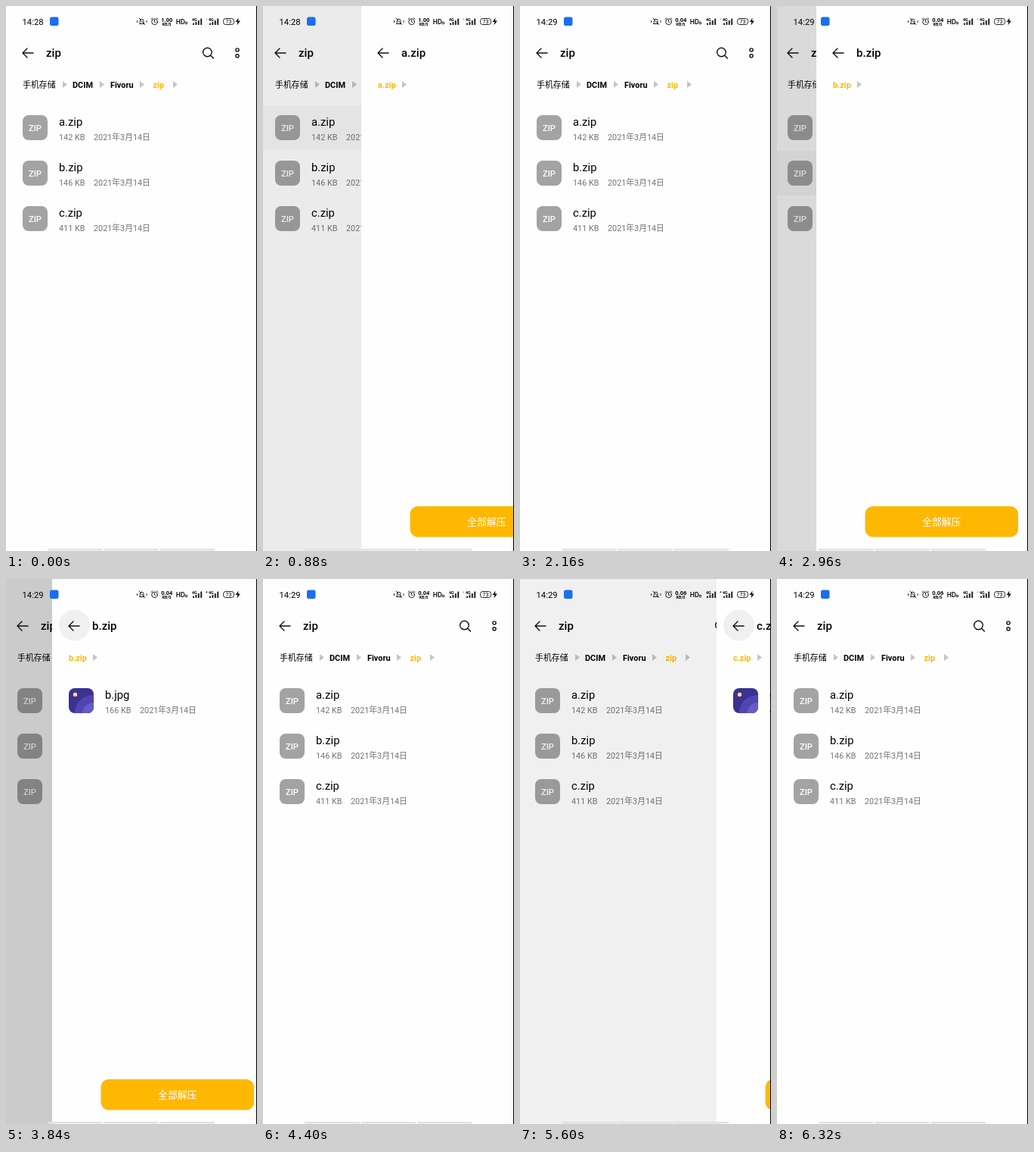
An HTML page that plays this animation: 332 px wide and 719 px high, repeating every 6720 ms.

```html
<!DOCTYPE html>
<html lang="zh-CN">
<head>
<meta charset="utf-8">
<title>Archive browser</title>
<style>
html, body { margin: 0; width: 100%; height: 100%; overflow: hidden; background: #fefefe; }
svg { display: block; width: 332px; height: 719px; font-family: Roboto, "Noto Sans CJK SC", "Noto Sans CJK", sans-serif; }
text { white-space: pre; }
.title { font-size: 15px; font-weight: 500; }
.crumb { font-size: 10.9px; font-weight: 700; }
.cjk { font-weight: 500; }
.name { font-size: 14.8px; }
.meta { font-size: 10.8px; fill: #747474; }
.badge { font-size: 11.2px; font-weight: 500; fill: #fff; text-anchor: middle; }
.button { font-size: 12.8px; font-weight: 500; fill: #fff; text-anchor: middle; }
.gold { fill: #ffb802; }
.line { fill: none; stroke: #111; stroke-width: 1.4; stroke-linecap: round; stroke-linejoin: round; }
.thin { fill: none; stroke: #222; stroke-width: 1; stroke-linecap: round; }
.tiny { font-size: 5.2px; font-weight: 700; }
.clock { font-size: 11.3px; }
.speed { font-size: 7.5px; font-weight: 700; }
.hd { font-size: 8.8px; font-weight: 500; }
.charge { font-size: 7px; text-anchor: middle; }
</style>
</head>
<body>
<svg viewBox="0 0 332 719">
  <g id="list"></g>
  <rect id="dim" width="332" height="719"/>
  <g id="panel"></g>
  <g id="status"></g>
</svg>
<script>
const LOOP = 6720, STEP = 80, WIDTH = 332;
const $ = id => document.getElementById(id);

const text = (x, y, cls, s, id = '') => `<text x="${x}" y="${y}" class="${cls}" id="${id}">${s}</text>`;
const rect = (x, y, w, h, r, fill, more = '') =>
  `<rect x="${x}" y="${y}" width="${w}" height="${h}" rx="${r}" fill="${fill}" ${more}/>`;
const dot = (x, y, r, fill, more = '') => `<circle cx="${x}" cy="${y}" r="${r}" fill="${fill}" ${more}/>`;
const ring = (x, y, r, cls = 'line') => dot(x, y, r, 'none', `class="${cls}"`);
const path = (d, cls = 'line') => `<path d="${d}" class="${cls}"/>`;
const chevron = x => `<path d="M${x} 99l6 4.5l-6 4.5z" fill="#c4c4c4"/>`;
const date = y => text(116, y, 'meta', '2021年3月14日');

const page = rect(0, 0, WIDTH, 719, 0, '#fefefe');
const back = path('M36 62H22M28 56l-6 6l6 6');
const more = ring(306, 58, 2.1) + ring(306, 65.8, 2.1);

const row = ([name, size], i) => {
  const y = 144 + 60 * i;
  return rect(22, y, 33, 33, 8, '#a3a3a3') + text(38.5, y + 21, 'badge', 'ZIP') +
    text(70, y + 13.5, 'name', name) + text(70, y + 33, 'meta', size + ' KB') + date(y + 33);
};

$('list').innerHTML = page +
  rect(0, 191, WIDTH, 59, 0, '#000', 'id="press" opacity=".03"') +
  back + text(53, 67, 'title', 'zip') +
  ring(266.4, 61, 5.8) + path('M270.6 65.2l3.8 3.8') + more +
  text(22, 108, 'crumb cjk', '手机存储') + text(88, 108, 'crumb', 'DCIM') +
  text(138, 108, 'crumb', 'Fivoru') + text(194.5, 108, 'crumb gold', 'zip') +
  [75, 124, 177, 221].map(chevron).join('') +
  [['a.zip', 142], ['b.zip', 146], ['c.zip', 411]].map(row).join('');

$('panel').innerHTML = page + dot(31, 61, 0, '#f0f0f0', 'id="ripple"') +
  back + text(53, 67, 'title', '', 'title') + more +
  text(22, 108, 'crumb gold', '', 'crumb') + chevron(54) +
  `<g id="file"><clipPath id="tile">${rect(22, 144, 33, 33, 8, '#000')}</clipPath>
  <g clip-path="url(#tile)">${rect(22, 144, 33, 33, 0, '#3b3191') + dot(54, 177, 24, '#5145b2') +
    dot(55, 178, 15, '#6859c8') + dot(30.5, 152.5, 2.7, '#ffd98c')}</g>` +
  text(70, 157.5, 'name', '', 'name') + text(70, 177, 'meta', '', 'size') + date(177) + '</g>' +
  rect(64.5, 660, 202.5, 40.5, 10, '#ffb802') + text(165.7, 685, 'button', '全部解压');

const signal = x => text(x - 1, 19.5, 'tiny', '4G') +
  [2.5, 4, 6, 8.5].map((h, i) => rect(x + 3.4 * i, 25 - h, 2, h, 0.4, '#222')).join('');

$('status').innerHTML = text(21.5, 24.5, 'clock', '', 'clock') +
  rect(58, 14.5, 11.5, 11.5, 2.5, '#1a6fee') +
  path('M176.5 23.5h6.5l-1-1.5v-2.5a2.3 2.3 0 0 0-4.6 0v2.5zM176 16l7.5 8.5M173.5 19.5v2M186 19.5v2', 'thin') +
  ring(196.5, 20.8, 3.8, 'thin') + path('M196.5 18.6v2.4l1.5 1M192 17.4l1.8-1.6M201 17.4l-1.8-1.6', 'thin') +
  text(205.2, 20.6, 'speed', '', 'speed') + text(206.8, 25.8, 'tiny', 'KB/S') +
  text(224.8, 24, 'hd', 'HD') + rect(237.2, 21.3, 2.4, 2.4, 0.4, 'none', 'class="thin"') +
  signal(247) + signal(269) + dot(265.2, 17.2, 0.6, '#444') +
  '<path id="traffic" d="M264.2 18l1.2-2l1.2 2z" fill="#222"/>' +
  rect(287.5, 16.5, 14, 8, 3, 'none', 'class="thin"') + text(294.5, 23.2, 'charge', '73') +
  '<path d="M307.5 15.5l-3.8 5.6h2.6l-.8 4.4l4.4-6h-2.8z" fill="#111"/>' +
  [0, 1, 2].map(i => rect(55 + 74.2 * i, 716, 73, 2.6, 1, '#e2e2e2')).join('') +
  rect(331, 0, 1, 719, 0, '#000');

// Panel positions, one per step
const leave = [0, 61, 260, WIDTH];
const visits = [
  { letter: 'a', size: 163, open: 800, close: 1920, enter: [WIDTH, 130, 35, 7, 0] },
  { letter: 'b', size: 166, open: 2960, close: 3760, enter: [52, 20, 7, 3, 1, 0] },
  { letter: 'c', size: 447, open: 4560, close: 5440, enter: [130, 35, 7, 0] }
];

const set = (id, attrs) => { for (const k in attrs) $(id).setAttribute(k, attrs[k]); };
const show = (id, on) => set(id, { visibility: on ? 'visible' : 'hidden' });
const within = (t, a, b) => t >= a && t < b;
const at = (xs, ms) => xs[Math.min(Math.floor(ms / STEP), xs.length - 1)];

function draw(t) {
  const n = Math.max(0, visits.findLastIndex(v => v.open <= t));
  const { letter, size, open, close, enter } = visits[n];
  const closing = t >= close;
  const x = t < open ? WIDTH : closing ? at(leave, t - close) : at(enter, t - open);
  const cover = 1 - x / WIDTH;
  const shift = Math.round(cover * (closing ? -8.6 : -9.5));

  set('list', { transform: `translate(${shift} 0)` });
  set('press', { y: 131 + 60 * n, width: WIDTH - shift });
  show('press', within(t, open, close) && x > 15);
  set('dim', { opacity: closing ? Math.min(0.2, cover / 4) : 0.2 * cover * cover });
  set('panel', { transform: `translate(${x} 0)` });
  set('ripple', x ? { r: 20.5, cx: 29.5 } : { r: 17.5, cx: 31.5 });
  show('ripple', closing);
  show('file', closing || x < 10);
  $('title').textContent = $('crumb').textContent = letter + '.zip';
  $('name').textContent = letter + '.jpg';
  $('size').textContent = size + ' KB';
  $('clock').textContent = t < 1360 ? '14:28' : '14:29';
  $('speed').textContent = t < 1520 ? '1.00' : t < 5360 ? '0.04' : '0.06';
  show('traffic', within(t, 3760, 4400) || within(t, 5360, 6320));
}

const start = performance.now();
function tick() {
  draw((performance.now() - start) % LOOP);
  requestAnimationFrame(tick);
}
tick();
</script>
</body>
</html>
```
